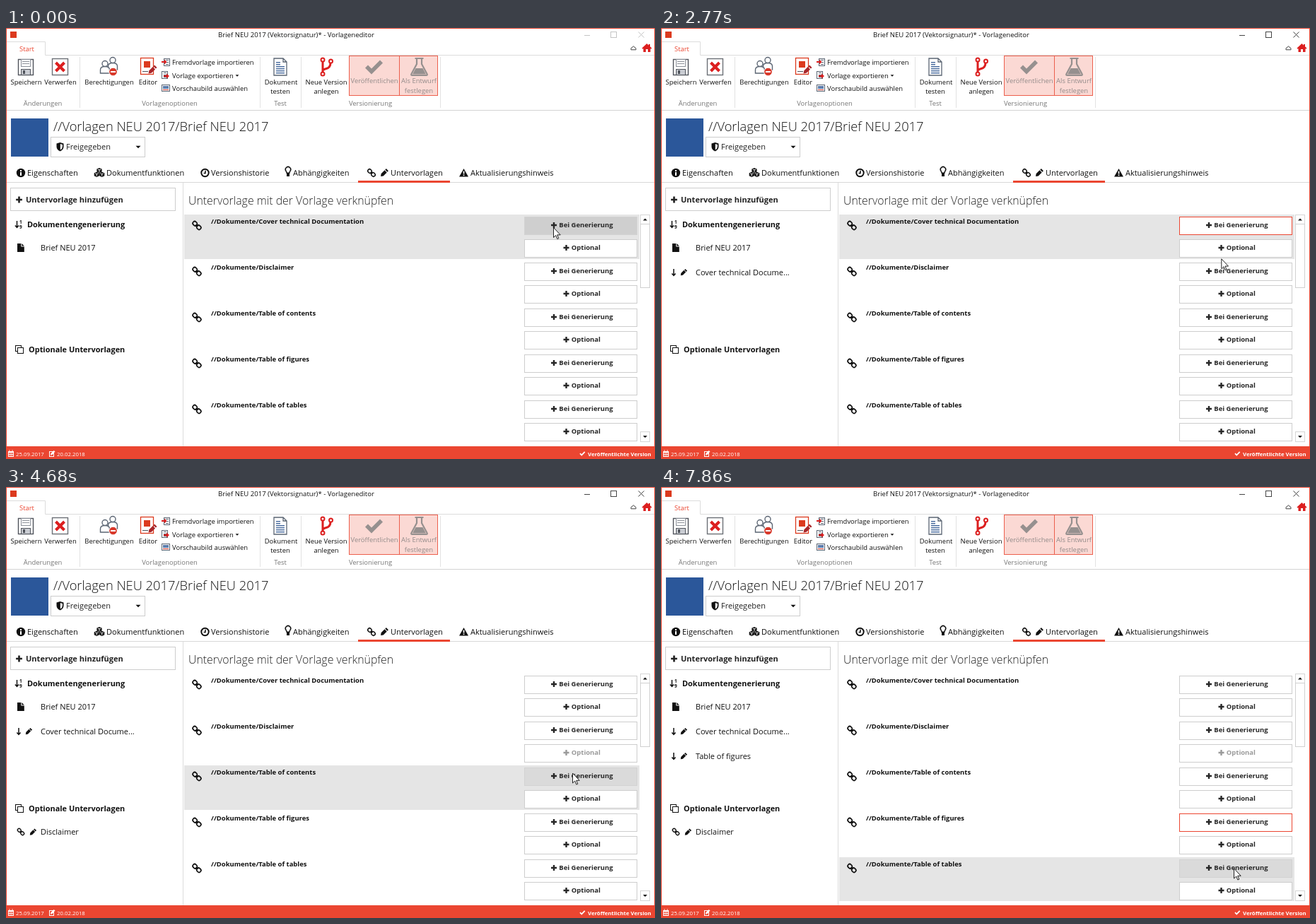
An HTML page with a canvas for the animation above (8 s loop, 918x610 px).

```html
<!DOCTYPE html>
<html lang="de">
<head>
<meta charset="utf-8">
<title>Vorlageneditor</title>
<style>
html, body { margin: 0; width: 100%; height: 100%; overflow: hidden; background: #fff; }
canvas { display: block; }
</style>
</head>
<body>
<canvas id="stage" width="918" height="610"></canvas>
<script>
const ctx = document.getElementById('stage').getContext('2d');
const LOOP = 8000;
const RED = '#eb4631', ICON_RED = '#dc1f1f', INK = '#111', SLATE = '#50545c', LINE = '#cdcdcd';
const SMALL = 9.45, BODY = 11;

const PLUS = 'M-4-1.2h2.8v-2.8h2.4v2.8h2.8v2.4h-2.8v2.8h-2.4v-2.8h-2.8z';
const PENCIL = 'M-7 0L-4-2.2H3V2.2H-4ZM4-2.2H6.2V2.2H4Z';
const CHAIN = 'M-4.4-2.7H-3.2a2.7 2.7 0 0 1 0 5.4H-4.4a2.7 2.7 0 0 1 0-5.4zM3.2-2.7H4.4a2.7 2.7 0 0 1 0 5.4H3.2a2.7 2.7 0 0 1 0-5.4zM-2 0H2';
const DOWN = 'M0-5V4M-2.6 1.6L0 4.4L2.6 1.6';
const CHECK = 'M-13 1L-9-3L-4 2L8-10L12-6L-4 10Z';
const CARET = 'M-3.5-1.8H3.5L0 1.8Z';
const POINTER = 'M0 0V14L3.2 11L5.3 16L7.3 15.2L5.2 10.3H9.7Z';

const ROWS = ['Cover technical Documentation', 'Disclaimer', 'Table of contents', 'Table of figures', 'Table of tables'];
const rowTop = i => 264 + 65 * i;

// Pointer moves: first step, last step, step count, end x, end y
const START = [774.5, 282.5];
const MOVES = [
  [280, 280, 1, 778.5, 282], [1950, 1950, 1, 779.5, 282.5], [2030, 2210, 3, 787, 296],
  [2390, 2490, 2, 790, 304], [2670, 3030, 5, 797, 361], [3210, 3210, 1, 798, 373],
  [3390, 3390, 1, 798.5, 375], [4320, 4320, 1, 799, 377], [4500, 4680, 3, 801.5, 405],
  [4860, 5220, 5, 806.5, 459], [5310, 5390, 2, 807.5, 470], [5580, 5580, 1, 808, 475],
  [6680, 6860, 3, 808.5, 488.4], [6950, 7310, 5, 809.5, 517], [7500, 7590, 2, 810, 530.5],
  [7770, 7860, 2, 810.5, 540]
];

function pointerAt(t) {
  let [x, y] = START;
  for (const [from, to, n, ex, ey] of MOVES) {
    if (t < from) break;
    const gap = n > 1 ? (to - from) / (n - 1) : 1;
    const part = Math.min(n, Math.floor((t - from) / gap + 1e-6) + 1) / n;
    x += (ex - x) * part;
    y += (ey - y) * part;
  }
  return { x, y };
}

function focusAt(t) {
  if (t >= 6040) return '3bei';
  if (t >= 3860) return t < 4040 ? '1opt' : '';
  return t >= 560 ? '0bei' : '';
}

const within = (t, a, b) => t >= a && t < b;
const isPressed = t => t < 740 || within(t, 3860, 4040) || within(t, 6040, 6310);

function rect(x, y, w, h, fill) {
  ctx.fillStyle = fill;
  ctx.fillRect(x, y, w, h);
}

function box(x, y, w, h, fill, line, width = 1) {
  if (fill) rect(x, y, w, h, fill);
  ctx.strokeStyle = line;
  ctx.lineWidth = width;
  ctx.strokeRect(x + .5, y + .5, w - 1, h - 1);
}

// y is the middle of the capitals
function text(s, x, y, size, { color = INK, weight = 400, align = 'left' } = {}) {
  ctx.font = `${weight} ${size}px "Open Sans", "Noto Sans", sans-serif`;
  ctx.textAlign = align;
  ctx.fillStyle = color;
  ctx.fillText(s, x, Math.round(y + size * .357));
}

function shape(d, x, y, { fill, stroke, width = 1.5, turn = 0, scale = 1 } = {}) {
  const path = new Path2D(d);
  ctx.save();
  ctx.translate(x, y);
  ctx.rotate(turn * Math.PI / 180);
  ctx.scale(scale, scale);
  if (fill) { ctx.fillStyle = fill; ctx.fill(path); }
  if (stroke) { ctx.strokeStyle = stroke; ctx.lineWidth = width; ctx.stroke(path); }
  ctx.restore();
}

function dot(x, y, r, fill, stroke, width = 1.5) {
  ctx.beginPath();
  ctx.arc(x, y, r, 0, 7);
  if (fill) { ctx.fillStyle = fill; ctx.fill(); }
  if (stroke) { ctx.strokeStyle = stroke; ctx.lineWidth = width; ctx.stroke(); }
}

const chain = (x, y, scale = 1) => shape(CHAIN, x, y, { stroke: INK, width: 1.7, turn: 45, scale });
const pencil = (x, y, scale = 1, fill = INK) => shape(PENCIL, x, y, { fill, turn: -45, scale });
const label = (s, x, y, color = INK) => text(s, x, y, SMALL, { color, align: 'center' });

function titleBar(active) {
  rect(6, 5, 9, 9, '#dc3a1e');
  text('Brief NEU 2017 (Vektorsignatur)* - Vorlageneditor', 410.5, 10, 9.59, { align: 'center' });
  const stroke = active ? '#444' : '#c4c4c4';
  shape('M-4 0H4', 822, 10.5, { stroke, width: 1 });
  box(855, 5, 9, 9, null, stroke);
  shape('M-4-4L4 4M4-4L-4 4', 898.5, 9.5, { stroke, width: 1 });
  shape('M.5 38.5V19.5H55.5V38.5H917', 0, 0, { stroke: '#dcdcdc', width: 1 });
  text('Start', 19, 29.5, SMALL, { color: RED });
  shape('M-3.5 2.3H3.5L3.5.3L0-2.7L-3.5.3Z', 887.5, 28.5, { stroke: '#444', width: 1 });
  shape('M-7 0L0-6.5L2.5-4V-5.5H4.5V-2.3L7 0L5.8 1.2L5 .5V5.5H1.5V1.5H-1.5V5.5H-5V.5L-5.8 1.2Z', 906.5, 28.5, { fill: ICON_RED });
}

function saveIcons() {
  box(17, 44, 22, 23, '#fff', SLATE, 1.4);
  box(21, 44, 14, 11, '#fff', '#8a8f98');
  rect(23, 47, 10, 1, '#8c9098');
  rect(23, 50, 10, 1, '#8c9098');
  box(21, 58, 14, 9, '#c9ccd2', SLATE);
  rect(24, 60, 3, 5, SLATE);
  box(65, 43, 23, 24, '#fff', '#6c7076', 1.4);
  shape('M-6-6L6 6M6-6L-6 6', 76.5, 55, { stroke: ICON_RED, width: 4 });
}

function person(x, y) {
  shape('M-6.5 11V6Q-6.5 1.5 0 1.5T6.5 6V11Z', x, y, { fill: '#fff', stroke: '#5b6573', width: 1.4 });
  dot(x, y - 2.5, 4, '#fff', '#5b6573', 1.4);
}

function sheetIcon(x, y) {
  box(x - 3, y - 5, 9, 11, '#fff', '#5b6573');
  for (let i = 0; i < 3; i++) rect(x, y - 3 + 3 * i, 4, 1, '#5b6573');
}

function templateIcons() {
  person(151, 48);
  person(140, 53);
  dot(151.5, 62, 5.8, '#d8392b', '#fff', 1);
  rect(148, 61, 7, 2, '#fff');
  box(190, 42, 19, 24, '#fff', '#dc3a1e', 1.3);
  rect(195, 47, 9, 9, '#dc3a1e');
  rect(193, 61, 8, 1, SLATE);
  pencil(207, 59, 1.1, '#a8262a');
  sheetIcon(226, 48);
  shape('M-6-1H-2V-3.5L1.5 0L-2 3.5V1H-6Z', 226, 48, { fill: ICON_RED });
  sheetIcon(223, 66);
  shape('M-4-1H0V-3.5L4 0L0 3.5V1H-4Z', 227, 68, { fill: ICON_RED });
  box(220, 80, 12, 10, '#fff', '#5b6573');
  rect(222, 82, 8, 4, '#5f7fae');
  rect(222, 87, 8, 1, '#d8392b');
}

function versionIcons() {
  shape('M-9-12H4L9-7V12H-9ZM4-12V-7H9', 388, 55, { fill: '#fff', stroke: '#5b6573', width: 1.3 });
  for (let i = 0; i < 6; i++) rect(382, 48 + 3 * i, i < 2 ? 6 : 12, 1.4, '#44689c');
  shape('M-5-9V10M6-6Q6 1 0 2.5T-5 7', 453, 55, { stroke: ICON_RED, width: 3 });
  for (const [x, y] of [[448, 45], [459.5, 47], [448, 65]]) dot(x, y, 2.5, '#fff', ICON_RED, 2);
  box(485, 39, 72, 57, '#fbd9d4', '#ec5f4d');
  box(556, 39, 55, 57, '#fbd9d4', '#ec5f4d');
  shape(CHECK, 521, 55.5, { fill: '#96908f' });
  shape('M-6-12H6M-3.5-12V-4L-11 10Q-12 12-10 12H10Q12 12 11 10L3.5-4V-12', 584.5, 55, { stroke: '#96908f', width: 2.2 });
  shape('M-5 2H5L9.5 10.5H-9.5Z', 584.5, 55, { fill: '#96908f' });
}

function ribbon() {
  saveIcons();
  templateIcons();
  versionIcons();
  label('Speichern', 28.5, 77);
  label('Verwerfen', 77, 77);
  label('Berechtigungen', 146, 77);
  label('Editor', 201, 77);
  text('Fremdvorlage importieren', 235, 49, SMALL);
  text('Vorlage exportieren', 235, 67.5, SMALL);
  shape(CARET, 327, 67.5, { fill: INK, scale: .7 });
  text('Vorschaubild auswählen', 235, 86, SMALL);
  label('Dokument', 389, 77);
  label('testen', 388, 90);
  label('Neue Version', 453, 77);
  label('anlegen', 453, 90);
  const dim = '#938b8a', group = '#777';
  label('Veröffentlichen', 521, 75, dim);
  label('Als Entwurf', 584, 75, dim);
  label('festlegen', 584, 88.5, dim);
  label('Änderungen', 52, 106.5, group);
  label('Vorlagenoptionen', 231.5, 106.5, group);
  label('Test', 388, 106.5, group);
  label('Versionierung', 515.5, 106.5, group);
  for (const x of [104, 359, 417, 614]) rect(x, 41, 1, 72, '#e2e2e2');
  rect(1, 116, 916, 1, '#d4d4d4');
}

function header() {
  rect(7, 128, 53, 54, '#2b579a');
  text('//Vorlagen NEU 2017/Brief NEU 2017', 67, 139.5, 18.3, { color: INK, weight: 300 });
  box(63, 154, 134, 29, '#fff', LINE);
  shape('M0-6L5-4.5V0Q5 4 0 6.5Q-5 4-5 0V-4.5Z', 76.5, 168, { fill: INK });
  shape('M.3-4L3.4-3V0Q3.4 2.8.3 4.5Z', 76.5, 168, { fill: '#fff' });
  text('Freigegeben', 85, 168, BODY, { color: '#222' });
  shape(CARET, 187, 168.5, { fill: INK });
}

function tabs() {
  dot(21, 205, 6.2, INK);
  rect(20, 201, 2, 2, '#fff');
  rect(20, 204, 2, 5, '#fff');
  for (const [x, y] of [[132, 201.5], [128.3, 207.3], [135.7, 207.3]]) {
    shape('M0-3.6L3.6-2V2L0 3.6L-3.6 2V-2Z', x, y, { fill: INK });
    shape('M-2.2-1.5L0-.6L2.2-1.5M0-.6V2.4', x, y, { stroke: '#fff', width: .9 });
  }
  dot(281.5, 205, 5.2, '#fff', INK, 2);
  shape('M0-3.2V.6H-2.4', 282, 205, { stroke: INK });
  shape('M-1.8 2.2Q-1.8.8-3-.6A3.7 3.7 0 1 1 3-.6Q1.8.8 1.8 2.2Z', 399, 203, { stroke: INK, width: 1.5 });
  rect(397, 206, 4, 4, INK);
  chain(517, 205, .9);
  pencil(535, 205);
  shape('M0-6L6.5 5.5H-6.5Z', 647.5, 205, { fill: INK });
  rect(646.7, 202.5, 1.7, 4, '#fff');
  rect(646.7, 207.5, 1.7, 1.6, '#fff');
  const names = { Eigenschaften: 30, Dokumentfunktionen: 142, Versionshistorie: 290, Abhängigkeiten: 406, Untervorlagen: 544, Aktualisierungshinweis: 657 };
  for (const name in names) text(name, names[name], 204.8, BODY);
  rect(1, 218, 916, 1, '#d8d8d8');
  rect(498, 216, 130, 3, RED);
}

function entry(name, y) {
  shape(DOWN, 18, y, { stroke: INK });
  pencil(32, y, .85);
  text(name, 49, y, BODY);
}

function sidebar(t) {
  const bold = { weight: 700 };
  box(6, 226, 234, 33, '#fff', LINE);
  shape(PLUS, 18.5, 243, { fill: '#222', scale: 1.1 });
  text('Untervorlage hinzufügen', 28, 243.5, 11.05, { weight: 700, color: '#222' });
  shape(DOWN, 15.5, 278, { stroke: INK });
  text('1', 19, 274.5, 6.5, bold);
  text('9', 19, 281.5, 6.5, bold);
  text('Dokumentengenerierung', 30, 278, 10.95, bold);
  shape('M-4.5-6H.8V-1.5H5.3V6H-4.5ZM1.8-6L5.3-2.5H1.8Z', 20.5, 311, { fill: INK });
  text('Brief NEU 2017', 49, 311, BODY);
  if (t >= 740) entry('Cover technical Docume...', 346);
  if (t >= 6310) entry('Table of figures', 381);
  box(13, 449, 9, 9, '#fff', INK);
  box(16, 452, 9, 9, '#fff', INK);
  text('Optionale Untervorlagen', 32, 455, 10.95, bold);
  if (t >= 4040) {
    chain(21, 488, .8);
    pencil(38, 488.5, .85);
    text('Disclaimer', 49, 488.5, BODY);
  }
  rect(250, 219, 1, 373, '#dcdcdc');
}

function button(name, plusX, y, h, { hover, pressed, focus, off }) {
  const fill = hover && !off ? (pressed ? '#cfcfcf' : '#dadada') : '#fff';
  const line = focus ? RED : fill === '#fff' ? LINE : '#d2d2d2';
  const color = off ? '#9a9a9a' : '#262626';
  box(733, y, 160, h, fill, line);
  shape(PLUS, plusX, y + 12, { fill: color });
  text(name, plusX + 7.3, y + 12, SMALL, { weight: 700, color });
}

function list(t, at) {
  text('Untervorlage mit der Vorlage verknüpfen', 258, 244, 15.85, { color: '#222', weight: 300 });
  const focus = focusAt(t), pressed = isPressed(t);
  const over = (y, h) => at.y >= y && at.y <= y + h + .5;
  ROWS.forEach((name, i) => {
    const y = rowTop(i);
    if (within(at.y, y - 1, y + 64)) rect(252, y, 644, Math.min(63, 586 - y), '#e5e5e5');
    chain(270, y + 15.5);
    text('//Dokumente/' + name, 290, y + 10, SMALL, { weight: 700 });
    button('Bei Generierung', 775, y + 3, 26, { hover: over(y + 3, 26), pressed, focus: focus === i + 'bei' });
    button('Optional', 792.5, y + 35, 26, {
      hover: over(y + 35, 26), pressed, focus: focus === i + 'opt', off: i === 1 && t >= 4040
    });
  });
  box(897, 264, 14, 14, '#fff', '#d6d6d6');
  box(897, 277, 14, 91, '#fff', '#d0d0d0');
  box(897, 571, 14, 15, '#fff', '#d6d6d6');
  shape(CARET, 904, 271, { fill: INK, turn: 180, scale: .85 });
  shape(CARET, 904, 578.5, { fill: INK, scale: .85 });
}

function statusBar() {
  rect(0, 592, 918, 18, RED);
  const white = { color: '#fff' };
  box(3, 599, 8, 8, null, '#fff');
  rect(3, 599, 8, 2, '#fff');
  shape('M1.5-5V-3M5.5-5V-3M0 1.5H7M2.3-1V4M4.7-1V4', 3.5, 602, { stroke: '#fff', width: .8 });
  text('25.09.2017', 14, 603, 7.8, white);
  box(61, 599, 7, 8, null, '#fff');
  pencil(66, 601.5, .6, '#fff');
  text('20.02.2018', 72, 603, 7.8, white);
  shape(CHECK, 815.5, 602.5, { fill: '#fff', scale: .32 });
  text('Veröffentlichte Version', 823, 603, 7.78, { color: '#fff', weight: 700 });
}

function draw(t) {
  const at = pointerAt(t);
  rect(0, 0, 918, 610, '#fff');
  titleBar(t >= 560);
  ribbon();
  header();
  tabs();
  sidebar(t);
  list(t, at);
  box(0, 0, 918, 610, null, RED);
  statusBar();
  shape(POINTER, at.x, at.y, { fill: '#fff', stroke: '#222', width: 1 });
}

const begin = performance.now();
function tick() {
  draw((performance.now() - begin) % LOOP);
  requestAnimationFrame(tick);
}
tick();
</script>
</body>
</html>
```
